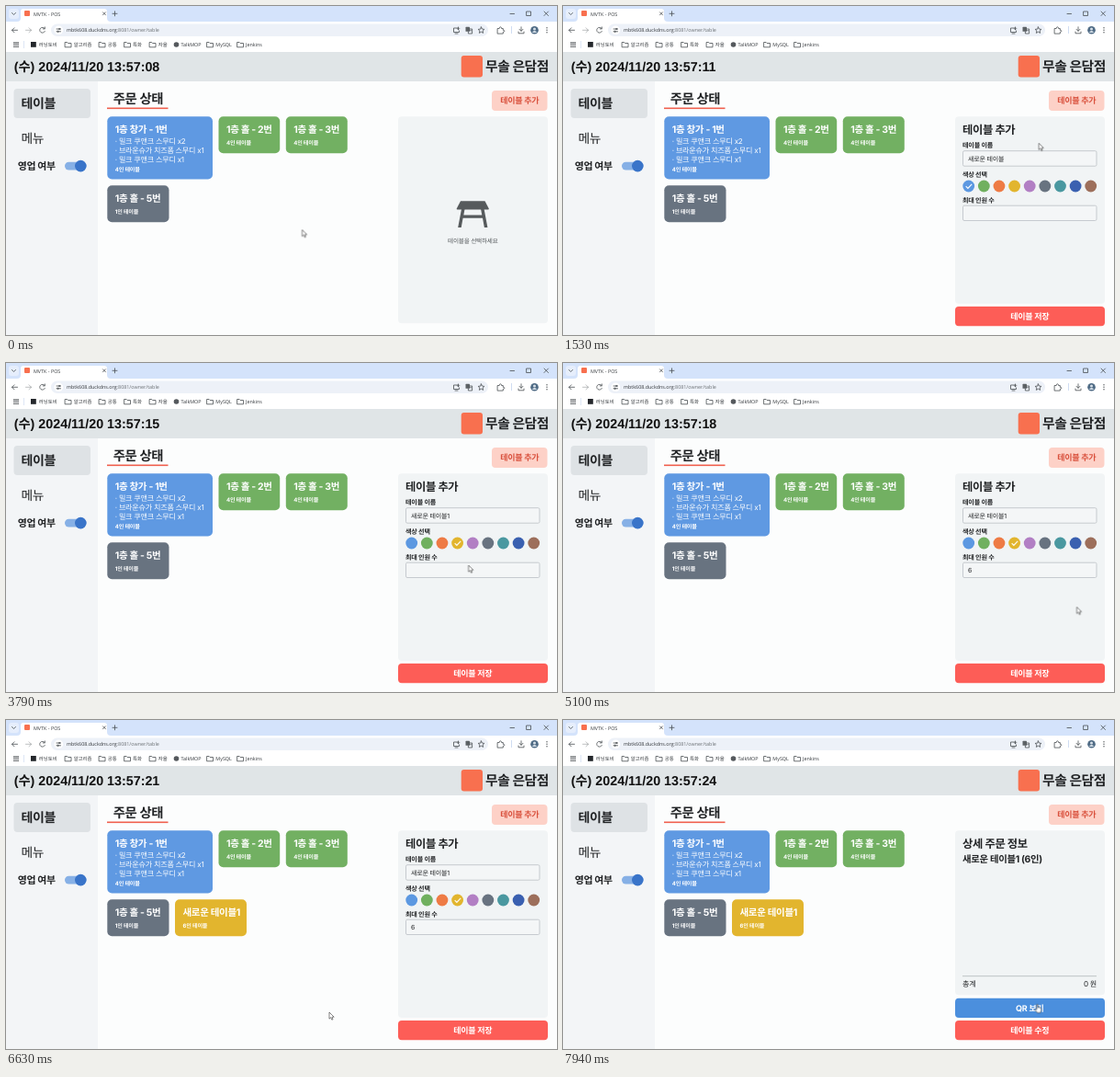
Recreate the animation shown at these times as an HTML page. Size 600x358 px, loop 8000 ms.

```html
<!DOCTYPE html>
<html lang="ko">
<head>
<meta charset="utf-8">
<title>Table POS</title>
<style>
html, body { margin: 0; width: 100%; height: 100%; overflow: hidden; background: #fcfdfd; }
svg { display: block; width: 600px; height: 358px; }
text {
  font-family: Inter, "Noto Sans CJK KR", "Noto Sans CJK JP", sans-serif;
  letter-spacing: -.03em; text-rendering: geometricPrecision; white-space: pre; fill: #202224;
}
.b { font-weight: 700; }
.w text { fill: #fff; }
.mid { text-anchor: middle; }
.end { text-anchor: end; }
.ui text { font: 5.4px "Open Sans", "Noto Sans CJK KR", sans-serif; letter-spacing: 0; fill: #33373b; }
#clock { font: 700 14.3px "Liberation Sans", "Noto Sans CJK KR", sans-serif; letter-spacing: 0; fill: #111; }
.title { font-size: 12.3px; }
.name { font-size: 10.5px; }
.item { font-size: 8.1px; }
.seats { font-size: 6.1px; }
.label { font-size: 7.1px; }
.value { font-size: 7px; }
.btn { font-size: 9.05px; }
.line { fill: none; stroke: #4a4e52; stroke-width: .8; stroke-linecap: round; stroke-linejoin: round; }
.field { fill: #f4f6f7; stroke: #c1c6ca; stroke-width: .9; }
.focus { fill: none; stroke: #3a78c6; stroke-width: 1.4; }
.caret { stroke: #222; stroke-width: .7; }

/* Timeline: 1% = 80 ms */
.t { animation: 8s step-end infinite; }
.empty { animation-name: empty; }
.form { animation-name: form; }
.detail { animation-name: detail; }
.focus1 { animation-name: focus1; }
.caret1 { animation-name: caret1; }
.digit { animation-name: digit; }
.pick { animation-name: pick; }
.focus2 { animation-name: focus2; }
.caret2 { animation-name: caret2; }
.count { animation-name: count; }
.fresh { animation-name: fresh; }
.add { fill: #fdd1c7; animation-name: add; }
.save { fill: #fd5d57; animation-name: save; }
.yellow { fill: #e2b52e; animation-name: yellow; }
.qr { fill: #5a97e2; animation-name: qr; }
.arrow { animation-name: arrow; }
.hand { animation-name: hand; }
.beam { animation-name: beam; }
.cursor { animation: move 8s ease-in-out infinite; }

@keyframes empty { 0% { opacity: 1 } 13.6%, to { opacity: 0 } }
@keyframes form { 0% { opacity: 0 } 13.6% { opacity: 1 } 95.6%, to { opacity: 0 } }
@keyframes detail { 0% { opacity: 0 } 95.6%, to { opacity: 1 } }
@keyframes focus1 { 0% { opacity: 0 } 22.8% { opacity: 1 } 42.7%, to { opacity: 0 } }
@keyframes caret1 { 0% { opacity: 0 } 22.8% { opacity: 1 } 27.3%, to { opacity: 0 } }
@keyframes digit { 0% { opacity: 0 } 33.7%, to { opacity: 1 } }
@keyframes pick { 0% { transform: none } 42.7%, to { transform: translateX(49.9px) } }
@keyframes focus2 { 0% { opacity: 0 } 49% { opacity: 1 } 61.9%, to { opacity: 0 } }
@keyframes caret2 { 0% { opacity: 0 } 49% { opacity: 1 } 52.8%, to { opacity: 0 } }
@keyframes count { 0% { opacity: 0 } 54.6%, to { opacity: 1 } }
@keyframes fresh { 0% { opacity: 0 } 73.7%, to { opacity: 1 } }
@keyframes add { 0% { fill: #fdd1c7 } 8.4% { fill: #d2a498 } 14.8%, to { fill: #fdd1c7 } }
@keyframes save { 0% { fill: #fd5d57 } 67.4% { fill: #cb4642 } 78.7%, to { fill: #fd5d57 } }
@keyframes yellow { 0% { fill: #e2b52e } 89.4% { fill: #b08d2c } 97%, to { fill: #e2b52e } }
@keyframes qr { 0% { fill: #5a97e2 } 98.4%, to { fill: #4b8fdd } }
@keyframes arrow {
  0% { opacity: 1 } 8.4% { opacity: 0 } 14.8% { opacity: 1 } 20.4% { opacity: 0 } 37.4% { opacity: 1 }
  40.4% { opacity: 0 } 44.6% { opacity: 1 } 47.6% { opacity: 0 } 58% { opacity: 1 } 67.4% { opacity: 0 }
  78.7% { opacity: 1 } 89.4% { opacity: 0 } 97% { opacity: 1 } 98.4%, to { opacity: 0 }
}
@keyframes hand {
  0% { opacity: 0 } 8.4% { opacity: 1 } 14.8% { opacity: 0 } 40.4% { opacity: 1 } 44.6% { opacity: 0 }
  67.4% { opacity: 1 } 78.7% { opacity: 0 } 89.4% { opacity: 1 } 97% { opacity: 0 } 98.4%, to { opacity: 1 }
}
@keyframes beam {
  0% { opacity: 0 } 20.4% { opacity: 1 } 37.4% { opacity: 0 } 47.6% { opacity: 1 } 58%, to { opacity: 0 }
}
@keyframes move {
  0%, .9% { transform: translate(322.5px, 243.5px) }
  9.6%, 14% { transform: translate(568.5px, 105px) }
  21.8%, 35.4% { transform: translate(502px, 163.5px) }
  41.2%, 43.5% { transform: translate(491.5px, 195px) }
  48.9%, 56.5% { transform: translate(506px, 225px) }
  62%, 64% { transform: translate(559.5px, 265.5px) }
  68.2%, 77.5% { transform: translate(509px, 340.5px) }
  82.6%, 85.4% { transform: translate(352px, 318px) }
  86.5%, 88.3% { transform: translate(296px, 268px) }
  91.4%, 95.8% { transform: translate(230px, 218px) }
  99%, to { transform: translate(516.5px, 309.5px) }
}
</style>
</head>
<body>
<svg viewBox="0 0 600 358">
  <defs>
    <path id="folder" class="line" d="M0 -2.5h2.2l.9 1h3.4v4.3H0z" />
  </defs>

  <!-- Browser -->
  <g class="ui">
    <rect width="600" height="24" fill="#d4e3fb" />
    <rect x="3" y="3" width="11" height="11" rx="3" fill="#e6eefc" />
    <path class="line" d="M6.5 7.5l2 2 2-2" />
    <path d="M12 17q4 0 4-4V6q0-3 3-3h88q3 0 3 3v7q0 4 4 4z" fill="#fff" />
    <rect x="20" y="5" width="6" height="6" rx="1" fill="#f8704f" />
    <text x="30" y="10.5">MVTK - POS</text>
    <path class="line" d="M105.5 6.8l3 3m0-3l-3 3M116 8.3h5m-2.5-2.5v5M549 8.5h4.5M567 6h4.5v4.5H567zM586 6l4.5 4.5m0-4.5L586 10.500" />
    <rect y="17" width="600" height="33" fill="#fff" />
    <path class="line" d="M12.500 26.300h-6m2.500-2.500l-2.500 2.500 2.500 2.500M42 24.500a2.900 2.900 0 1 0 .3 3M42.300 22.900v2h-2" />
    <path class="line" stroke-opacity=".45" d="M21.500 26.300h6m-2.500-2.500l2.500 2.500-2.500 2.500" />
    <rect x="49" y="19.500" width="476" height="13.500" rx="6.700" fill="#edf1f8" />
    <circle cx="57.300" cy="26.300" r="4.800" fill="#fff" />
    <path class="line" d="M55 25h2m1.800 0h.8M55 27.800h.6m2 0h2" />
    <circle class="line" cx="58" cy="25" r=".7" /><circle class="line" cx="56.500" cy="27.800" r=".7" />
    <text x="66" y="28.400">mbtk608.duckdns.org<tspan fill="#6b7074">:8081/owner/table</tspan></text>
    <path class="line" d="M493 24h-5.500v4.500h6v-1.500M489 30h3M492.500 23v2.800m-1.200-1.200l1.200 1.200 1.200-1.200" />
    <rect x="500.500" y="22.800" width="4.500" height="5" rx=".6" fill="#5d6266" />
    <path class="line" d="M505 25h2.600v5h-4.200v-2.200M505 26.800h1.500" />
    <path class="line" d="M517.500 22.900l1 2.200 2.400.3-1.800 1.600.5 2.400-2.100-1.200-2.100 1.200.5-2.400-1.800-1.600 2.400-.3z" />
    <path class="line" d="M535.500 24.500h1.700q0-1.700 1.200-1.700t1.200 1.700h1.700v1.800q1.500 0 1.500 1t-1.500 1v1.800h-5.800z" />
    <path d="M550.500 22v8" stroke="#cfdcf2" />
    <path class="line" d="M561 22.800v4.500m-2-2l2 2 2-2M558 28v1.800h6V28" />
    <circle cx="575.500" cy="26.300" r="4.300" fill="#4f6b85" />
    <circle cx="575.500" cy="25" r="1.500" fill="#d5dee7" /><path d="M572.700 29q2.800-4 5.600 0z" fill="#d5dee7" />
    <g fill="#4a4e52"><circle cx="589" cy="23.800" r=".7" /><circle cx="589" cy="26.300" r=".7" /><circle cx="589" cy="28.800" r=".7" /></g>
    <path d="M8.200 40h5.600m-5.600 2.200h5.600m-5.600 2.200h5.600" stroke="#4a4e52" stroke-width="1.300" stroke-dasharray="1.500 .55" />
    <path d="M19.500 38v8" stroke="#d5e0f3" stroke-width=".8" />
    <rect x="27" y="39" width="5.800" height="5.800" fill="#24272b" />
    <text x="35.800" y="44">러닝토비</text>
    <use href="#folder" x="64.500" y="42" /><text x="73.700" y="44">알고리즘</text>
    <use href="#folder" x="101.500" y="42" /><text x="110.700" y="44">공통</text>
    <use href="#folder" x="129" y="42" /><text x="138" y="44">특화</text>
    <use href="#folder" x="156.500" y="42" /><text x="165.700" y="44">자율</text>
    <circle cx="185.500" cy="42" r="2.800" fill="#55595d" /><text x="190.500" y="44">TalkMOP</text>
    <use href="#folder" x="219" y="42" /><text x="228.300" y="44">MySQL</text>
    <use href="#folder" x="252" y="42" /><text x="261" y="44">Jenkins</text>
  </g>

  <!-- Header and sidebar -->
  <rect y="50" width="600" height="32" fill="#e0e5e7" />
  <text id="clock" x="8.700" y="71">(수) 2024/11/20 13:57:08</text>
  <rect x="495.700" y="54" width="23.300" height="23.500" rx="3" fill="#f8704f" />
  <text class="b" x="522" y="71.300" font-size="14.800">무솔 은담점</text>
  <rect y="82" width="100" height="276" fill="#f3f5f7" />
  <rect x="8.500" y="90" width="83.500" height="32" rx="4" fill="#dee2e5" />
  <text class="b" x="16.500" y="111" font-size="14">테이블</text>
  <text x="16.500" y="148.700" font-size="13.800">메뉴</text>
  <text class="b" x="12.700" y="177.800" font-size="10.900">영업 여부</text>
  <rect x="64" y="169.700" width="23.500" height="8.800" rx="4.400" fill="#86b0e6" />
  <circle cx="81.300" cy="174.100" r="6.300" fill="#3974c9" />

  <text class="b" x="116.800" y="105.700" font-size="14.400">주문 상태</text>
  <rect x="110" y="110.500" width="66.500" height="1.600" fill="#f0614f" />
  <rect class="t add" x="529" y="92" width="60.500" height="22" rx="4" />
  <text class="b btn mid" x="559.200" y="106.300" style="fill:#d9513d">테이블 추가</text>

  <!-- Tables -->
  <g class="w">
    <rect x="110.300" y="120.300" width="114.700" height="68.200" rx="5" fill="#5f99e2" />
    <text class="b name" x="118.800" y="137.600">1층 창가 - 1번</text>
    <text class="item" x="118.800" y="149.500">· 밀크 쿠앤크 스무디 x2</text>
    <text class="item" x="118.800" y="159.500">· 브라운슈가 치즈폼 스무디 x1</text>
    <text class="item" x="118.800" y="169.500">· 밀크 쿠앤크 스무디 x1</text>
    <text class="b seats" x="118.800" y="179.500">4인 테이블</text>

    <rect x="231.500" y="120.300" width="66.700" height="40" rx="5" fill="#72b062" />
    <text class="b name" x="240" y="137.600">1층 홀 - 2번</text>
    <text class="b seats" x="240" y="151.200">4인 테이블</text>

    <rect x="304.800" y="120.300" width="67" height="40" rx="5" fill="#72b062" />
    <text class="b name" x="313.200" y="137.600">1층 홀 - 3번</text>
    <text class="b seats" x="313.200" y="151.200">4인 테이블</text>

    <rect x="110.300" y="195.300" width="67.200" height="40" rx="5" fill="#687380" />
    <text class="b name" x="118.800" y="212.600">1층 홀 - 5번</text>
    <text class="b seats" x="118.800" y="226.200">1인 테이블</text>

    <g class="t fresh">
      <rect class="t yellow" x="184" y="195.300" width="78" height="40" rx="5" />
      <text class="b name" x="192.500" y="212.600">새로운 테이블1</text>
      <text class="b seats" x="192.500" y="226.200">6인 테이블</text>
    </g>
  </g>

  <!-- Nothing selected -->
  <g class="t empty">
    <rect x="427" y="120.300" width="163" height="225" rx="4" fill="#f1f4f5" />
    <g fill="#565a5c">
      <path d="M495 212.300h26.500l4.300 8.200q.2 1-.8 1h-33.500q-1 0-.8-1z" />
      <path d="M496 221h3.500l-1.200 6.500h20l-1.200-6.500h3.500l3.800 20h-3.500l-1.900-10.300h-21.400L495.700 241h-3.500z" />
    </g>
    <text class="mid" x="508.300" y="258.300" font-size="6.600" style="fill:#55595c">테이블을 선택하세요</text>
  </g>

  <!-- New table -->
  <g class="t form">
    <rect x="427" y="120.300" width="163" height="203.700" rx="4" fill="#f1f4f5" />
    <text class="b title" x="435" y="139">테이블 추가</text>
    <text class="b label" x="435" y="154.200">테이블 이름</text>
    <rect class="field" x="435.500" y="157.700" width="145.500" height="16.500" rx="1.500" />
    <rect class="focus t focus1" x="435.500" y="157.700" width="145.500" height="16.500" rx="1.500" />
    <text class="value" x="441" y="168.500">새로운 테이블<tspan class="t digit">1</tspan></text>
    <rect class="t digit-mask" x="0" y="0" width="0" height="0" />
    <path class="caret t caret1" d="M480.300 160.500v9.500" />
    <text class="b label" x="435" y="186">색상 선택</text>
    <g id="dots"></g>
    <path class="t pick" d="M438.700 196.200l2.200 2.200 4.300-4.600" fill="none" stroke="#fff" stroke-width="1.100" />
    <text class="b label" x="435" y="213.600">최대 인원 수</text>
    <rect class="field" x="435.500" y="217.200" width="145.500" height="16.300" rx="1.500" />
    <rect class="focus t focus2" x="435.500" y="217.200" width="145.500" height="16.300" rx="1.500" />
    <path class="caret t caret2" d="M441.300 220.500v9.500" />
    <text class="value t count" x="441" y="228">6</text>
    <g class="w">
      <rect class="t save" x="427" y="327" width="163" height="21.300" rx="4" />
      <text class="b btn mid" x="508.300" y="341">테이블 저장</text>
    </g>
  </g>

  <!-- Order details -->
  <g class="t detail">
    <rect x="427" y="120.300" width="163" height="179" rx="4" fill="#f1f4f5" />
    <text class="b title" x="435" y="139">상세 주문 정보</text>
    <text class="b" x="435" y="155" font-size="10.400">새로운 테이블1 (6인)</text>
    <path d="M435 278.700h146" stroke="#a9aeb2" stroke-width=".7" />
    <text class="item" x="435" y="289.700">총계</text>
    <text class="item end" x="581" y="289.700">0 원</text>
    <g class="w">
      <rect class="t qr" x="427" y="302.700" width="163" height="21.300" rx="4" />
      <text class="b btn mid" x="508.300" y="316.700">QR 보기</text>
      <rect x="427" y="327" width="163" height="21.300" rx="4" fill="#fd5d57" />
      <text class="b btn mid" x="508.300" y="341">테이블 수정</text>
    </g>
  </g>

  <!-- Pointer, hot spot at 0,0 -->
  <g class="cursor" fill="#fff" stroke="#333" stroke-width=".6" stroke-linejoin="round">
    <path class="t arrow" d="M0 0v7.200l1.700-1.500 1.100 2.500 1.200-.5-1.100-2.500h2.300z" />
    <path class="t hand" d="M-.7 .2q.7-.8 1.400 0v3q2.800 0 3.500 1 .4 2.500-.7 4.800h-3.500q-1.500-1.500-2.500-3.500 .3-1 1.800 0z" />
    <path class="t beam" d="M-1.800 -3.800q1.800 0 1.800 1v5.600q0 1-1.800 1M1.800 -3.800q-1.800 0-1.800 1v5.600q0 1 1.800 1" fill="none" stroke="#222" stroke-width=".8" />
  </g>
</svg>
<script>
const colors = ["#5c98e1", "#70b05f", "#ee7b45", "#e2b52e", "#b27fc4", "#687380", "#4a98a0", "#3a60b0", "#9d6f5b"];
document.getElementById("dots").innerHTML = colors
  .map((c, i) => `<circle cx="${441.7 + 16.63 * i}" cy="196" r="6.400" fill="${c}"/>`).join("");

const clock = document.getElementById("clock");
function tick() {
  const time = performance.now() % 8000;
  const sec = 8 + Math.floor((time + 220) / 510);
  const label = "(수) 2024/11/20 13:57:" + String(sec).padStart(2, "0");
  if (clock.textContent !== label) clock.textContent = label;
  requestAnimationFrame(tick);
}
tick();
</script>
</body>
</html>
```
